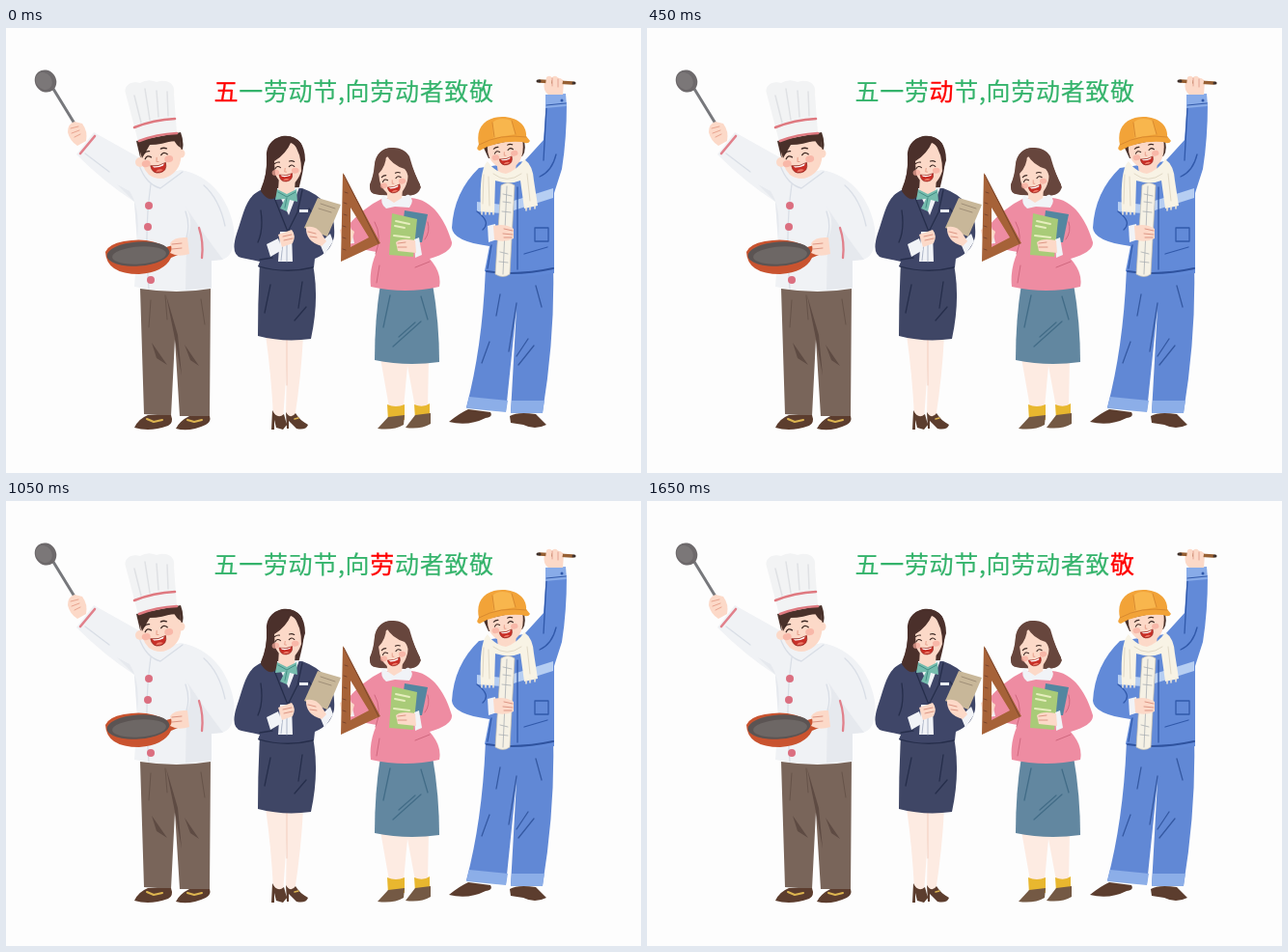
Write an HTML page that moves like this. It is 658 px wide and 461 px high and loops after 1.8 s.

```html
<!DOCTYPE html>
<html lang="zh">
<head>
<meta charset="utf-8">
<style>
  html, body { margin: 0; width: 100%; height: 100%; overflow: hidden; background: #fdfdfd; }
  svg { display: block; width: 658px; height: 461px; }
  text { font: 25px "Noto Sans CJK SC", "Noto Sans CJK", sans-serif; letter-spacing: .68px; fill: #34b36b; stroke: #34b36b; stroke-width: .2; }
  .lit { fill: #f00; stroke: #f00; stroke-width: .3; }
  .line { fill: none; stroke-linecap: round; stroke-linejoin: round; }
  .skin { fill: #fcd9c8; }
  .leg { fill: #fdebe2; }
  .shoe { fill: #5c3d2e; }
  .white { fill: #f1f3f7; }
</style>
</head>
<body>
<svg viewBox="0 0 658 461">
  <defs>
    <g id="face">
      <g fill="#f7a99b" opacity=".7"><ellipse cx="-12" cy="-5" rx="4.500" ry="3.500"/><ellipse cx="12" cy="-5" rx="4.500" ry="3.500"/></g>
      <path class="line" stroke="#3b2722" stroke-width="1.300" d="M-12-10q3-4 6.500-.5M5-10.500q3.500-3.500 6.500 .5M-12-16q3-2 6-1M6-17q3-1 6 1"/>
      <path class="line" stroke="#e59b86" d="M0-9l-1 4 2 .5"/>
      <path fill="#c92f27" stroke="#8c2820" stroke-width=".7" d="M-8-2Q0 1 8-2Q8 7 0 7T-8-2Z"/>
      <path fill="#fff" d="M-6-1.200Q0 1 6-1.200L5 .500Q0 2-5 .500Z"/>
      <path fill="#ec7a68" d="M-4 5Q0 2 4 5Q0 7-4 5Z"/>
    </g>
  </defs>

  <g id="chef">
    <path class="line" stroke="#77787c" stroke-width="3" d="M49 63L79 112"/>
    <ellipse cx="41" cy="55" rx="10.800" ry="12" transform="rotate(-38 41 55)" fill="#6d696b"/>
    <ellipse cx="39.500" cy="54.500" rx="8" ry="9.500" transform="rotate(-38 40 55)" fill="#7b7778"/>
    <path class="skin" d="M64 108Q64 99 71 97L79 99Q85 107 83 117L74 122Q66 117 64 108Z"/>
    <path class="line" stroke="#e8a48f" d="M67 104l8-2M68 109l8-3M71 113l6-3"/>
    <path fill="#f0f2f5" d="M91 108L141 136Q158 154 181 147C213 153 231 178 236 207Q239 235 224 240L213 241V270Q172 276 133 268L136 225L133 180Q102 160 73 131Z"/>
    <path fill="#e6e9ee" d="M186 185Q196 200 187 219L186 271L213 269V241L225 240Q208 218 186 185ZM115 162L133 180L136 218Q139 185 128 169Z"/>
    <path class="line" stroke="#d9dee6" stroke-width="1.300" d="M138 142Q145 162 160 166L183 149M150 162Q143 210 148 270M186 190Q191 204 187 217M82 130l25 19M205 163q16 14 22 42"/>
    <path class="line" stroke="#e1808b" stroke-width="2.600" d="M77 130L92 112"/>
    <path class="line" stroke="#e1808b" stroke-width="2.300" d="M200 207Q205 222 203 238"/>
    <g fill="#db6f80"><circle cx="148" cy="184" r="4"/><circle cx="147" cy="206" r="4"/><circle cx="150" cy="261" r="4"/></g>
    <path fill="#49312a" d="M135 117L181 108Q186 121 181 133L140 138Z"/>
    <circle class="skin" cx="139" cy="139" r="5"/><circle class="skin" cx="181" cy="130" r="4.500"/>
    <path class="skin" d="M139 126Q147 118 163 118L180 117Q185 140 174 150Q161 161 148 152Q139 143 139 126Z"/>
    <path fill="#49312a" d="M136 118L180 109L181 124Q176 121 174 116Q162 121 149 121Q145 128 141 135Z"/>
    <use href="#face" transform="translate(158 143) rotate(-12)"/>
    <path fill="#f2f3f4" d="M124 68C121 59 131 54 139 57Q147 52 156 56C167 52 176 58 174 68L177 109Q155 110 137 118L133 102Z"/>
    <path class="line" stroke="#dfe1e4" stroke-width="1.500" d="M133 70L140 98M144 63L149 95M156 65L158 92M167 66L168 91"/>
    <path class="line" stroke="#df7980" stroke-width="2.600" d="M133 103Q153 95 175 94M138 117Q156 110 177 109"/>
    <path fill="#c9532f" d="M103 232Q104 255 138 255Q164 253 171 238L188 231Q189 224 183 222L166 227Q148 216 122 221Q106 224 103 232Z"/>
    <ellipse cx="137" cy="234" rx="32.500" ry="12.500" fill="#5b5453" transform="rotate(-4 137 234)"/>
    <ellipse cx="138" cy="235.500" rx="28" ry="9" fill="#6d6765" transform="rotate(-4 138 235)"/>
    <path class="skin" d="M188 217Q174 216 170 223Q173 229 170 233Q179 238 190 234Z"/>
    <path class="line" stroke="#dd9684" d="M172 224l10-1M172 229l10-1"/>
    <path fill="#79655a" d="M139 270Q178 276 212 270L211 402H180L175 322L171 402L143 400Z"/>
    <path fill="#5e4b43" d="M175 322L166 277L178 318L182 360ZM151 326l16 23-11-7ZM185 328l15 22-9-6Z"/>
    <path class="line" stroke="#665349" d="M150 282l-2 28M202 281l4 26M165 277l2 25"/>
    <path class="shoe" d="M133 414Q137 405 147 401H171Q174 409 168 412Q149 419 133 414ZM176 415Q180 407 190 402H211Q213 408 207 411Q190 419 176 415Z"/>
    <path class="line" stroke="#ddb550" stroke-width="2" d="M146 405l7 3 9-2M188 406l7 2 8-2"/>
  </g>

  <g id="clerk">
    <path fill="#4b302b" d="M270 133C269 111 296 105 306 120C312 135 307 152 303 168L278 180Q269 182 264 167Q271 151 270 133Z"/>
    <path class="leg" d="M269 318H308Q306 360 299 405L290 401L291 350L287 406L277 403Q275 360 269 318Z"/>
    <path class="line" stroke="#f3cdbd" d="M291 323V370"/>
    <path fill="#3f4665" d="M263 244Q290 251 318 245Q325 280 316 322Q288 326 261 319Q261 280 263 244Z"/>
    <path fill="#3f4668" d="M270 166C248 171 247 191 239 213Q232 235 244 238L263 242L261 247Q287 255 319 248L320 239Q337 232 340 216Q343 179 307 166Z"/>
    <path class="white" d="M280 166L304 165L293 194ZM284 211L296 211L297 242H282Z"/>
    <path class="line" stroke="#aeb6c8" d="M287 222l-2 19M291 223v19"/>
    <path class="line" stroke="#262e4b" stroke-width="1.300" d="M275 168L284 191L292 211L302 191L307 168M264 189Q267 209 261 222M263 240l13-2M314 187q8 11 2 20M274 266l-6 29M307 263l-4 27M299 303l12-14M262 247q28 8 56 1"/>
    <path fill="#fcd9c8" d="M283 154H300L299 168L291 176L282 168Z"/>
    <path class="skin" d="M275 133Q276 119 293 118Q309 124 307 145Q302 163 291 164Q276 157 275 133Z"/>
    <path fill="#4b302b" d="M296 117Q290 131 278 138Q279 158 282 172Q274 184 264 169Q272 149 270 133Q272 113 290 112Q310 113 310 137L306 150Q307 130 296 117Z"/>
    <use href="#face" transform="translate(290 153) rotate(-6) scale(.85)"/>
    <path fill="#76bcae" d="M291 172L281 167L279 178L289 177L284 187L291 190L294 178L302 180L301 167Z"/>
    <path class="line" stroke="#438e85" d="M282 170l9 5 9-5M291 176l-2 10"/>
    <path fill="#e9edf2" d="M304 188h9v3h-9Z"/>
    <path fill="#c8b799" d="M323 176L347 183L333 216L309 207Z"/>
    <path class="line" stroke="#9f8e77" d="M326 182l15 5M324 187l13 4"/>
    <path class="white" d="M270 224l12-6 4 12-12 7ZM325 223l11-10 3 8-9 14Z"/>
    <path class="skin" d="M282 214L296 209Q301 215 297 223L286 227ZM311 206Q321 204 327 213L332 221L327 226Q310 221 311 206Z"/>
    <path class="line" stroke="#dd9684" d="M287 216l9-2M288 220l9-2M313 211l8 2M315 216l7 1"/>
    <path class="shoe" d="M276 396Q281 406 288 400L291 411L287 416L280 414L278 406V416H275ZM290 398Q295 406 300 399Q304 406 313 411Q311 417 301 415L293 407V415H291Z"/>
    <path class="line" stroke="#ddb550" stroke-width="1.500" d="M299 405l4-1"/>
  </g>

  <g id="teacher">
    <path class="leg" d="M388 342H438L437 393H424L416 350L412 393H397Z"/>
    <path fill="#e8b72f" d="M395 390Q404 394 413 390V406L396 407ZM423 390Q432 394 439 389V402L424 405Z"/>
    <path fill="#745944" d="M385 415L396 403L413 401L412 411Q402 417 385 415ZM414 414L424 401L440 399L440 410Q430 416 414 414Z"/>
    <path fill="#6287a0" d="M388 265H442Q449 305 449 346Q415 351 382 344Q382 302 388 265Z"/>
    <path class="line" stroke="#426c87" stroke-width="1.300" d="M398 277l-7 33M430 278l7 24M407 320l17-15M401 330l29-26"/>
    <path fill="#67463d" d="M382 141C384 121 410 119 418 133Q424 154 429 162Q429 174 414 174L387 173Q376 172 377 162Q381 153 382 141Z"/>
    <path fill="#ee8ca2" d="M391 176H419C443 177 456 201 462 222Q463 232 439 239Q452 254 449 268Q414 276 378 268Q376 250 384 232L357 227L352 207Q370 186 391 176Z"/>
    <path class="line" stroke="#cf677e" d="M382 201Q390 215 383 234M437 201q3 10-3 18M387 246l-3 18M439 242l-15 6"/>
    <path class="skin" d="M394 165H411L410 181H396Z"/>
    <path class="white" d="M390 173L402 181L417 172Q424 178 418 186L403 185L394 187Q387 182 390 173Z"/>
    <path class="skin" d="M386 148Q388 134 400 132Q417 139 417 153Q414 172 402 175Q386 169 386 148Z"/>
    <path fill="#67463d" d="M394 131Q394 143 386 151L388 171Q377 175 377 164Q382 151 382 141Q385 124 400 124Q417 126 419 140L430 165Q426 176 414 172Q420 153 413 146Q400 142 394 131Z"/>
    <use href="#face" transform="translate(402 165) rotate(-14) scale(.82)"/>
    <path fill="#5486a0" d="M413 189L437 193L431 222L409 222Z"/>
    <path fill="#a9cb78" d="M400 192L426 198L422 237L397 235Z"/>
    <path class="line" stroke="#e6eebd" stroke-width="2" d="M404 200l14 3M403 205l10 2M402 215l16 2"/>
    <path class="white" d="M347 207l10-1 4 17-12 1ZM423 219l5-2 3 18-7 3Z"/>
    <path class="skin" d="M346 209Q354 204 361 211L358 222L348 219ZM424 220Q409 217 404 222L406 231L425 233Z"/>
    <path class="line" stroke="#dd9684" d="M406 223l8-1M406 227h9"/>
    <path fill="#a66238" fill-rule="evenodd" d="M349 150L388 223L347 242ZM357 186V227L376 217Z"/>
    <path class="line" stroke="#7b452c" d="M350 152l36 71M351 170l3 1M350 181l3 1M350 193l3 1M349 205l3 1M349 217l3 1M349 229l3 1"/>
  </g>

  <g id="worker">
    <path fill="#6188d5" d="M497 247L567 245Q569 318 556 398H523L529 290L518 397L477 393Q494 329 497 247Z"/>
    <path fill="#8caee8" d="M480 382L520 386L518 398L477 394ZM524 386L558 386L556 399H523Z"/>
    <path class="line" stroke="#3559a2" stroke-width="1.300" d="M529 285L521 335M512 276l-4 22M549 267l6 22M501 325l-8 22M541 322l-12 18M547 329l-16 20"/>
    <path class="shoe" d="M459 408Q470 399 479 395L502 398Q505 403 497 404Q479 413 459 408ZM522 402Q530 397 549 400L560 411Q548 417 536 411L523 409Z"/>
    <path fill="#628ad8" d="M560 75L581 77Q581 115 576 146L568 171L568 254Q531 261 496 252L501 226Q463 221 462 207Q464 170 490 145L537 138L557 116Z"/>
    <path fill="#b6cef2" d="M488 180L514 183L513 192L488 190ZM526 179L567 166V176L526 189Z"/>
    <path class="line" stroke="#3159aa" stroke-width="1.300" d="M488 190Q503 201 494 209M530 165V250M503 225L499 249M560 82L557 137M553 154Q566 148 570 131M548 207h14v14h-14ZM537 234l24-7"/>
    <path class="line" stroke="#2f539f" stroke-width="2" d="M498 252Q530 257 567 249"/>
    <path fill="#88abe8" d="M559 69L580 68L581 81L559 83Z"/>
    <path class="line" stroke="#3159aa" d="M560 80l20-2"/><circle cx="576" cy="75" r="1.500" fill="#3159aa"/>
    <path class="skin" d="M558 55Q569 47 578 55L577 69H562Q556 65 558 55Z"/>
    <path class="line" stroke="#986033" stroke-width="3.600" d="M553 55L587 57"/>
    <path class="line" stroke="#3e302b" stroke-width="3" d="M551 55h2M588 57h1"/>
    <path class="skin" d="M560 51q4-3 6 1l-1 8q-4 3-6-1ZM566 51q4-3 6 1v8q-4 3-6-1ZM572 53q4-2 5 2l-1 6q-4 2-5-2Z"/>
    <path class="line" stroke="#dd9684" stroke-width=".8" d="M566 52v8M572 53v8"/>
    <path fill="#49312a" d="M494 122L536 114Q540 126 535 133L500 135Z"/>
    <path class="skin" d="M508 136H529L528 151H510Z"/>
    <path fill="#f8f3e5" d="M499 138Q506 149 518 151Q530 147 537 136Q546 142 547 158L551 184L537 187L533 158Q520 163 507 158L506 191L492 190Q490 146 499 138Z"/>
    <path class="line" stroke="#e0d8c5" d="M495 152l-1 30M500 154l1 30M540 151l3 28M505 151q14 11 29 0"/>
    <path class="line" stroke="#f2e9d6" stroke-width="1.500" d="M493 190v3m4-3v3m4-3v3m4-3v3M539 186v3m4-4v3m5-4v3"/>
    <path class="skin" d="M499 122L535 114Q538 134 529 142Q517 150 506 141Q498 134 499 122Z"/>
    <use href="#face" transform="translate(518 136) rotate(-13) scale(.83)"/>
    <path fill="#f2a338" d="M490 121C486 102 498 92 514 92C532 92 540 103 539 112L543 117Q541 121 535 118Q510 116 491 127Q486 126 490 121Z"/>
    <path fill="#f8b64d" d="M504 98Q512 91 524 96L528 110L505 114Z"/>
    <path class="line" stroke="#d98a2f" d="M490 121Q512 109 539 113M504 98L506 113M524 96L528 110"/>
    <path fill="#f5f1e5" stroke="#c7c2b4" stroke-width=".7" d="M513 163Q520 158 527 163L522 255Q515 260 507 255Z"/>
    <path class="line" stroke="#aaafb3" stroke-width=".8" d="M519 164l-4 91M515 172l9 2M515 180l8 1M514 190l9 1M512 232l8 2M511 242l9 1"/>
    <path class="white" d="M499 205l8-2 2 16-9 3Z"/>
    <path class="skin" d="M505 205Q517 202 526 208V218Q516 223 506 219Z"/>
    <path class="line" stroke="#dd9684" d="M516 208l9 2M515 213l10 1M516 217l8 0"/>
  </g>

  <text id="slogan" x="215.500" y="75"></text>
</svg>
<script>
  const STEP = 150;
  const slogan = document.getElementById('slogan');
  const glyphs = [...'五一劳动节,向劳动者致敬'].map(char => {
    const span = document.createElementNS('http://www.w3.org/2000/svg', 'tspan');
    span.textContent = char;
    return slogan.appendChild(span);
  });
  const start = performance.now();

  function draw(now) {
    const lit = Math.floor(Math.max(0, now - start) / STEP) % glyphs.length;
    glyphs.forEach((glyph, i) => glyph.classList.toggle('lit', i === lit));
    requestAnimationFrame(draw);
  }
  draw(start);
</script>
</body>
</html>
```
